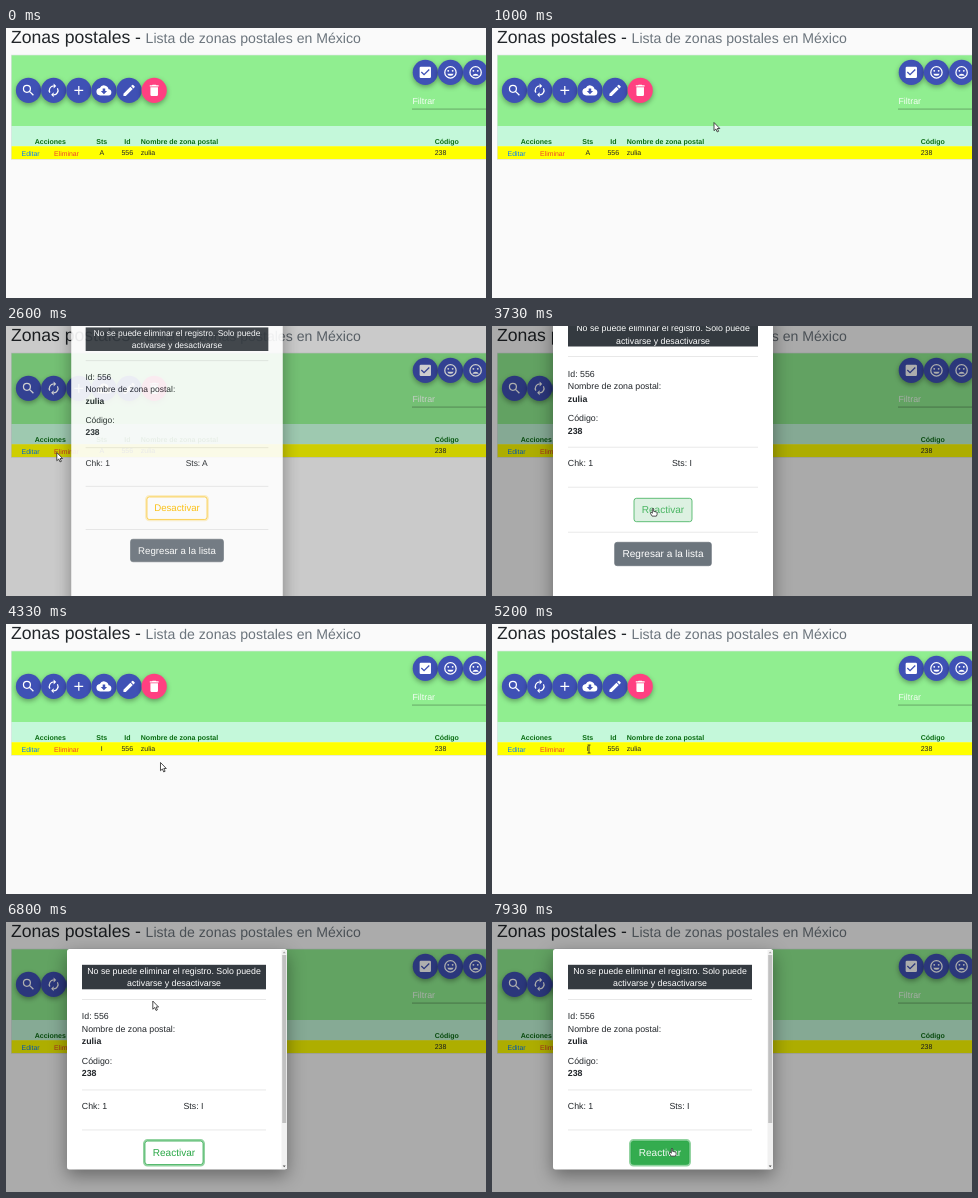
These frames come from a looping animation (480x270 px, 8 s). An HTML page:

```html
<!DOCTYPE html>
<html lang="es">
<head>
<meta charset="utf-8">
<title>Zonas postales</title>
<style>
html, body { margin: 0; width: 100%; height: 100%; overflow: hidden; background: #fafafa; }
svg { display: block; width: 480px; height: 270px; font-family: "Liberation Sans", Arial, sans-serif; text-rendering: geometricPrecision; }
.fab { filter: drop-shadow(0 2.2px 2.6px rgba(0,0,0,.34)); }
.panel { filter: drop-shadow(0 6px 9px rgba(0,0,0,.4)); }
</style>
</head>
<body>
<svg id="stage" viewBox="0 0 480 270" xmlns="http://www.w3.org/2000/svg">
  <defs><clipPath id="clip"><rect id="clipBox" x="61" width="220" rx="2.5"/></clipPath></defs>
  <rect width="480" height="270" fill="#fafafa"/>
  <g id="page"></g>
  <rect id="shade" width="480" height="270"/>
  <g id="dialog">
    <rect id="panel" class="panel" x="61" width="220" rx="2.5" fill="#fff"/>
    <g clip-path="url(#clip)"><g id="content"></g></g>
    <g id="scrollbar">
      <rect x="275.5" y="28" width="5.5" height="219" fill="#f1f1f1"/>
      <rect x="276.2" y="33" width="4" height="168" fill="#c1c1c1"/>
      <path d="M276.7 31.3h3l-1.5-1.8z" fill="#a3a3a3"/>
      <path d="M276.7 243.5h3l-1.5 1.8z" fill="#505050"/>
    </g>
  </g>
  <g id="cursor" stroke-linejoin="round">
    <path id="arrow" d="M0 0V8.2L1.9 6.5 3.2 9.4 4.6 8.8 3.3 6H5.8z" fill="#fff" stroke="#222" stroke-width=".8"/>
    <path id="hand" transform="scale(.85)" d="M-.8 .7a.8 .8 0 0 1 1.6 0V3.4L4 4.1a1 1 0 0 1 .8 1V7L4 9H-1L-3 5.8a.8 .8 0 0 1 1.2-1L-.8 5.6z" fill="#fff" stroke="#222" stroke-width=".9"/>
    <path id="beam" d="M-1.5 -1h3M0 -1V7M-1.5 7h3" fill="none" stroke="#222" stroke-width=".8"/>
  </g>
</svg>
<script>
const LOOP = 8000;
const $ = id => document.getElementById(id);
const clamp = v => Math.min(1, Math.max(0, v));
const easeOut = (t, power) => 1 - (1 - clamp(t)) ** power;
const set = (el, attrs) => { for (const k in attrs) el.setAttribute(k, attrs[k]); };
const show = (el, on) => set(el, { visibility: on ? 'visible' : 'hidden' });

function add(parent, tag, attrs, text) {
  const el = document.createElementNS('http://www.w3.org/2000/svg', tag);
  set(el, attrs);
  if (text) el.textContent = text;
  parent.appendChild(el);
  return el;
}
const label = (parent, text, x, y, size, fill, extra) =>
  add(parent, 'text', { x, y, 'font-size': size, fill, ...extra }, text);

const BOLD = { 'font-weight': 'bold' };
const MIDDLE = { 'text-anchor': 'middle' };
const DARK = '#212529';

// Icons on a 24 unit grid: l = stroked, f = filled
const face = mouth => ({
  l: 'M12 3a9 9 0 0 1 0 18a9 9 0 0 1 0-18z',
  f: 'M7 9.5a1.5 1.5 0 0 1 3 0a1.5 1.5 0 0 1-3 0zM14 9.5a1.5 1.5 0 0 1 3 0a1.5 1.5 0 0 1-3 0z' + mouth
});
const ICONS = {
  search: { l: 'M4 9.5a5.5 5.5 0 0 1 11 0a5.5 5.5 0 0 1-11 0zM13.6 13.6L19.8 19.8' },
  renew: { l: 'M6 15.5A7 7 0 0 1 12 5M18 8.5A7 7 0 0 1 12 19', f: 'M12 1l4 4-4 4zM12 15v8l-4-4z' },
  plus: { l: 'M12 5v14M5 12h14' },
  cloud: { f: 'M19.35 10.04A7.5 7.5 0 0 0 5.35 8.04A6 6 0 0 0 6 20H19A5 5 0 0 0 19.35 10.04zM17 13l-5 5-5-5h3V9h4v4z' },
  edit: { f: 'M3 17.25V21h3.75L17.8 9.94 14.06 6.19zM20.7 7a1 1 0 0 0 0-1.4L18.4 3.3a1 1 0 0 0-1.4 0L15.1 5.1l3.75 3.75z' },
  trash: { f: 'M6 19a2 2 0 0 0 2 2h8a2 2 0 0 0 2-2V7H6zM19 4h-3.5l-1-1h-5l-1 1H5v2h14z' },
  check: { f: 'M5 3h14a2 2 0 0 1 2 2v14a2 2 0 0 1-2 2H5a2 2 0 0 1-2-2V5a2 2 0 0 1 2-2zM10 17L19 8 17.6 6.6 10 14.2 6.4 10.6 5 12z' },
  happy: face('M6.9 14a5.5 5.5 0 0 0 10.2 0z'),
  sad: face('M6.9 17.5a5.5 5.5 0 0 1 10.2 0z')
};

function fab(parent, name, x, y, fill = '#3f51b5') {
  const g = add(parent, 'g', { transform: `translate(${x} ${y})` });
  add(g, 'circle', { r: 12.6, fill, class: 'fab' });
  const icon = add(g, 'g', { transform: 'scale(.63) translate(-12 -12)' });
  const { l, f } = ICONS[name];
  if (l) add(icon, 'path', { d: l, fill: 'none', stroke: '#fff', 'stroke-width': 2 });
  if (f) add(icon, 'path', { d: f, fill: '#fff', 'fill-rule': 'evenodd' });
}

function buildPage(page) {
  label(page, 'Zonas postales -', 4.9, 15.2, 17.6, DARK);
  label(page, 'Lista de zonas postales en México', 139.6, 15.2, 14.08, '#6c757d');

  add(page, 'rect', { x: 5, y: 27, width: 480, height: 71, fill: '#90ee90' });
  add(page, 'rect', { x: 5, y: 98, width: 480, height: 20.2, fill: '#c4f8da' });
  add(page, 'rect', { x: 5, y: 118.2, width: 480, height: 13, fill: '#ff0' });
  add(page, 'rect', { x: 5.3, y: 27, width: 480, height: 104.4, fill: 'none', stroke: '#dee2e6', 'stroke-width': .63 });

  ['search', 'renew', 'plus', 'cloud', 'edit'].forEach((name, i) => fab(page, name, 22.5 + i * 25.15, 62.4));
  fab(page, 'trash', 148.2, 62.4, '#ff4081');
  ['check', 'happy', 'sad'].forEach((name, i) => fab(page, name, 419.3 + i * 25.15, 44.4));

  label(page, 'Filtrar', 406.5, 76.2, 8.8, '#fff', { 'fill-opacity': .9 });
  add(page, 'rect', { x: 406, y: 80.7, width: 74, height: .7, fill: '#000', 'fill-opacity': .42 });

  const head = (text, x, extra) => label(page, text, x, 115.5, 7.04, '#0a6c12', { ...BOLD, ...extra });
  head('Acciones', 44.3, MIDDLE);
  head('Sts', 95.8, MIDDLE);
  head('Id', 121.3, MIDDLE);
  head('Nombre de zona postal', 134.8);
  head('Código', 428.7);

  const cell = (text, x, fill = DARK, extra) => label(page, text, x, 127.4, 7, fill, extra);
  const link = (text, x, fill) => label(page, text, x, 127.9, 6.9, fill);
  link('Editar', 15.6, '#007bff');
  link('Eliminar', 48, '#f0402c');
  cell('556', 121.3, DARK, MIDDLE);
  cell('zulia', 134.8);
  cell('238', 428.7);
  const status = cell('A', 95.8, DARK, MIDDLE);
  const caret = add(page, 'rect', { x: 96.6, y: 121.5, width: .7, height: 7, fill: '#444' });
  return { status, caret };
}

function button(parent, y) {
  const box = { y: y - 11.7, height: 23.4, rx: 2.5 };
  return {
    ring: add(parent, 'rect', { y: y - 12.7, height: 25.4, rx: 3.5, fill: 'none', 'stroke-width': 2 }),
    box: add(parent, 'rect', { ...box, 'stroke-width': .7 }),
    text: label(parent, '', 0, y + 3.4, 10.05, '#fff', MIDDLE)
  };
}

function paintButton(b, text, mid, width, o) {
  set(b.ring, { x: mid - width / 2 - 1, width: width + 2, stroke: o.color, 'stroke-opacity': .5 * o.ring });
  set(b.box, { x: mid - width / 2, width, fill: o.color, 'fill-opacity': o.fill, stroke: o.color });
  set(b.text, { x: mid, fill: o.ink });
  b.text.textContent = text;
}

function buildContent(c) {
  const bar = add(c, 'rect', { x: 76, y: -4, height: 24.5, fill: '#343a40' });
  const warn = [
    label(c, 'No se puede eliminar el registro. Solo puede', 0, 5.2, 8.8, '#fff', MIDDLE),
    label(c, 'activarse y desactivarse', 0, 17.6, 8.8, '#fff', MIDDLE)
  ];
  const rules = [30.3, 120.8, 160.8, 205.8].map(y => add(c, 'rect', { x: 76, y, height: .7, fill: '#dfdfdf' }));
  const line = (text, y, extra) => label(c, text, 75.8, y, 8.8, DARK, extra);
  line('Id: 556', 50.6);
  line('Nombre de zona postal:', 62.8);
  line('zulia', 75.5, BOLD);
  line('Código:', 95.2);
  line('238', 107.7, BOLD);
  line('Chk: 1', 140.3);
  const sts = label(c, '', 0, 140.3, 8.8, DARK);
  return { bar, warn, rules, sts, toggle: button(c, 184), back: button(c, 228) };
}

const row = buildPage($('page'));
const form = buildContent($('content'));

// Time, x, y of the pointer tip
const PATH = [
  [330, 480, 187], [1000, 222, 94.5], [1060, 222, 94.5], [1450, 150, 187], [2050, 56, 127],
  [2400, 50.8, 126.5], [2750, 50.8, 126.5], [3400, 161, 182.5], [3740, 161, 182.5],
  [3880, 168, 226], [3960, 168, 226], [4330, 154.5, 138.5], [4640, 97, 122], [5500, 97, 122],
  [6150, 145.4, 71], [6700, 145.4, 71], [7480, 176, 246], [7820, 180, 226.5], [LOOP, 180, 226.5]
];
const HAND = [[1980, 2530], [3180, 3990], [5950, 6600], [7700, LOOP]];
const BEAM = [[4580, 5580]];
const inside = (spans, t) => spans.some(([a, b]) => t >= a && t < b);

// The row link opens the tall form, the toolbar button a scrolling one
const VISITS = [
  { open: 2533, close: 3940, tall: true },
  { open: 6530, close: Infinity, tall: false }
];
const SWAP = 3700;

function pointerAt(t) {
  const i = Math.max(1, PATH.findIndex(p => p[0] > t));
  const [t0, x0, y0] = PATH[i - 1], [t1, x1, y1] = PATH[i];
  const k = clamp((t - t0) / (t1 - t0)), e = k * k * (3 - 2 * k);
  return [x0 + (x1 - x0) * e, y0 + (y1 - y0) * e];
}

function drawPointer(t) {
  const [x, y] = pointerAt(t);
  set($('cursor'), { transform: `translate(${x} ${y})` });
  const on = t >= 330, hand = inside(HAND, t), beam = inside(BEAM, t);
  show($('arrow'), on && !hand && !beam);
  show($('hand'), on && hand);
  show($('beam'), on && beam);
}

function mixInk(rgb, k) {
  return `rgb(${rgb.map(v => Math.round(v + (255 - v) * k))})`;
}

function drawForm(t, visit) {
  const { tall, open } = visit;
  const width = tall ? 190 : 184, mid = 76 + width / 2;
  const active = t < SWAP;
  set(form.bar, { width });
  form.rules.forEach(r => set(r, { width }));
  form.warn.forEach(w => set(w, { x: mid }));
  set(form.sts, { x: tall ? 180 : 177.5 });
  form.sts.textContent = 'Sts: ' + (active ? 'A' : 'I');

  const focus = clamp((t - open) / 150);
  if (active) {
    const hover = clamp((t - 3180) / 150);
    paintButton(form.toggle, 'Desactivar', mid, 62.5, {
      color: '#ffc107', fill: hover, ring: focus,
      ink: hover > .5 ? DARK : '#ffc107'
    });
  } else {
    const hover = tall ? clamp((t - SWAP) / 200) * clamp((3860 - t) / 60) : clamp((t - 7790) / 150);
    paintButton(form.toggle, 'Reactivar', mid, 58, {
      color: '#28a745', fill: hover, ring: tall ? 0 : focus, ink: mixInk([40, 167, 69], hover)
    });
  }
  paintButton(form.back, 'Regresar a la lista', mid, 96.7, { color: '#6c757d', fill: 1, ring: 0, ink: '#fff' });
}

function drawDialog(t) {
  const visit = VISITS.find(v => t >= v.open && t < v.close + 400);
  show($('shade'), !!visit);
  set($('dialog'), { display: visit ? 'inline' : 'none' });
  if (!visit) return;

  const { open, close, tall } = visit;
  const shade = t < close ? easeOut((t - open) / 400, 5) : 1 - easeOut((t - close) / 400, 5);
  set($('shade'), { 'fill-opacity': .32 * shade });

  const scale = .7 + .3 * easeOut((t - open) / 150, 3.4);
  const opacity = Math.min(clamp((t - open) / 75), 1 - clamp((t - close) / 75));
  set($('dialog'), { opacity, transform: `translate(171 137.2) scale(${scale}) translate(-171 -137.2)` });

  const frame = tall ? { y: -20, height: 314 } : { y: 27, height: 220.5 };
  set($('panel'), frame);
  set($('clipBox'), frame);
  set($('content'), { transform: `translate(0 ${tall ? 0 : 46.8})` });
  set($('scrollbar'), { display: tall ? 'none' : 'inline' });
  drawForm(t, visit);
}

function draw(t) {
  row.status.textContent = t < SWAP ? 'A' : 'I';
  show(row.caret, t >= 5300);
  drawDialog(t);
  drawPointer(t);
}

const start = performance.now();
function tick() {
  draw((performance.now() - start) % LOOP);
  requestAnimationFrame(tick);
}
tick();
</script>
</body>
</html>
```
